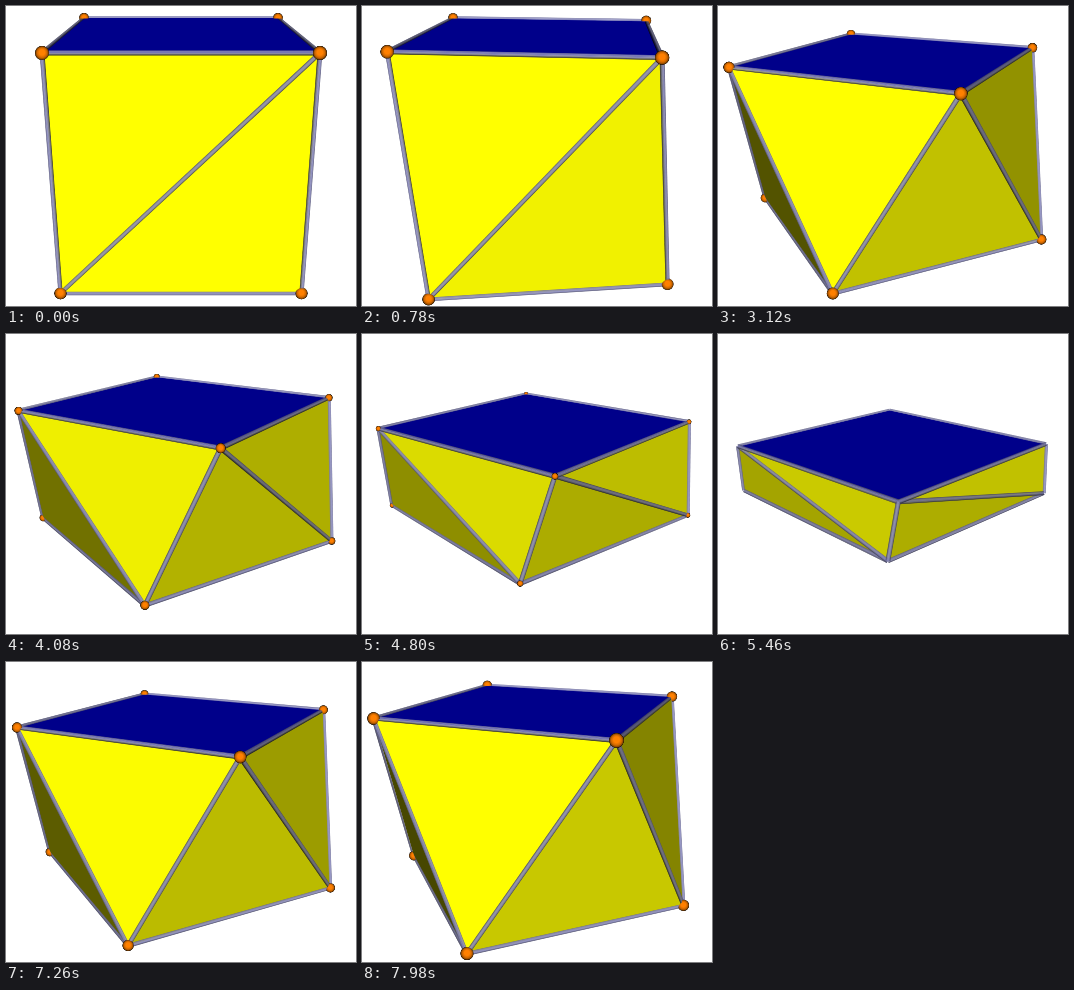
Animation of 350x300 px, one loop 8 s. Source, as an HTML page with a canvas:

```html
<!DOCTYPE html>
<html>
<head>
<meta charset="utf-8">
<title>Twisting prism</title>
<style>
  html, body { margin: 0; width: 100%; height: 100%; overflow: hidden; background: #fff; }
  canvas { display: block; }
</style>
</head>
<body>
<canvas id="stage" width="350" height="300"></canvas>
<script>
const ctx = document.getElementById('stage').getContext('2d');
const STEP = 60, LOOP = 8000, TURN = 89;
const SIN = 1 / 3, COS = Math.sqrt(1 - SIN * SIN);
const DISTANCE = 5.63, FOCAL = 605, LIFT = 0.095;
const CENTER = [175, 144.9];
const CAMERA = [0, DISTANCE * SIN - LIFT * COS, DISTANCE * COS + LIFT * SIN];
const LIGHT = [0, 0.5, 0.965], AMBIENT = 0.04;
const TUBE = 0.017, BALL = 0.05, STRIPS = 8;
const YELLOW = [255, 255, 0], BLUE = [0, 0, 255], STEEL = [136, 136, 187], ORANGE = [255, 128, 0];

const add = (a, b, k = 1) => a.map((v, i) => v + b[i] * k);
const sub = (a, b) => add(a, b, -1);
const dot = (a, b) => a[0] * b[0] + a[1] * b[1] + a[2] * b[2];
const unit = a => a.map(v => v / Math.hypot(...a));
const cross = (a, b) => [
  a[1] * b[2] - a[2] * b[1],
  a[2] * b[0] - a[0] * b[2],
  a[0] * b[1] - a[1] * b[0]
];
const brightness = normal => AMBIENT + Math.max(0, dot(normal, LIGHT));
const tint = (color, level) => `rgb(${color.map(c => Math.round(c * Math.min(1, level)))})`;

// Vertices 0-3 are the upper square, 4-7 the lower one.
const faces = [{ ids: [3, 2, 1, 0], color: BLUE }, { ids: [4, 5, 6, 7], color: BLUE }];
const edges = [];
for (let i = 0; i < 4; i++) {
  const prev = (i + 3) % 4;
  faces.push(
    { ids: [prev, i, prev + 4], color: YELLOW },
    { ids: [i + 4, prev + 4, i], color: YELLOW }
  );
  edges.push([prev, i], [prev + 4, i + 4], [i, i + 4], [i, prev + 4]);
}

function project(p) {
  const depth = DISTANCE - p[1] * SIN - p[2] * COS;
  const scale = FOCAL / depth;
  return {
    scale, depth,
    x: CENTER[0] + p[0] * scale,
    y: CENTER[1] - (p[1] * COS - p[2] * SIN + LIFT) * scale
  };
}

function polygon(points, color) {
  ctx.beginPath();
  points.map(project).forEach(({ x, y }) => ctx.lineTo(x, y));
  ctx.closePath();
  ctx.fillStyle = color;
  ctx.fill();
}

// Lengthwise strips, each lit by its own normal and left out where it lies inside the solid.
function tube(a, b, normals) {
  const axis = unit(sub(b, a));
  const side = unit(cross(axis, sub(CAMERA, add(a, sub(b, a), 0.5))));
  const front = cross(side, axis);
  for (let i = 0; i < STRIPS; i++) {
    const from = 2 * i / STRIPS - 1, to = from + 2 / STRIPS, mid = (from + to) / 2;
    const normal = add(side.map(v => v * mid), front, Math.sqrt(1 - mid * mid));
    if (!normals.some(n => dot(n, normal) > 0)) continue;
    const u = from * TUBE, w = Math.min(1, to + 0.1) * TUBE;
    polygon([add(a, side, u), add(b, side, u), add(b, side, w), add(a, side, w)],
      tint(STEEL, brightness(normal)));
  }
}

function ballShade({ x, y }, r) {
  const shade = ctx.createRadialGradient(x, y - r * 0.15, 0, x, y, r);
  for (const t of [0, 0.4, 0.7, 0.9, 1]) {
    shade.addColorStop(t, tint(ORANGE, 0.1 + Math.sqrt(1 - t * t)));
  }
  return shade;
}

function ball(p, radius) {
  const spot = project(p), r = spot.scale * radius;
  ctx.fillStyle = ballShade(spot, r);
  ctx.beginPath();
  ctx.arc(spot.x, spot.y, r, 0, 2 * Math.PI);
  ctx.fill();
}

// The part of a ball that stands out from one face: half a disc and half an ellipse.
function ballAbove(p, radius, { normal }) {
  const spot = project(p), r = spot.scale * radius;
  const angle = Math.atan2(-(normal[1] * COS - normal[2] * SIN), normal[0]);
  const facing = dot(normal, unit(sub(CAMERA, p)));
  const quarter = Math.PI / 2;
  ctx.fillStyle = ballShade(spot, r);
  ctx.beginPath();
  ctx.arc(spot.x, spot.y, r, angle - quarter, angle + quarter);
  ctx.ellipse(spot.x, spot.y, r * facing, r, angle, quarter, 3 * quarter);
  ctx.fill();
}

function draw(time) {
  const step = Math.floor(time % LOOP / STEP);
  const twist = (TURN - Math.abs(TURN - step)) * Math.PI / 360;
  // The upright edges keep their length, so twisting lowers the solid.
  const height = Math.sqrt(Math.cos(2 * twist));
  const diagonal = 2 * Math.sqrt(height * height + 1 - Math.sin(2 * twist));
  const radius = BALL * Math.min(2, diagonal) / 2;

  const vertices = Array.from({ length: 8 }, (_, i) => {
    const level = i < 4 ? 1 : -1;
    const angle = Math.PI / 4 + i % 4 * Math.PI / 2 - level * twist;
    return [Math.SQRT2 * Math.sin(angle), level * height, Math.SQRT2 * Math.cos(angle)];
  });

  const solid = faces.map(({ ids, color }) => {
    const corners = ids.map(i => vertices[i]);
    const [a, b, c] = corners;
    const normal = unit(cross(sub(c, a), sub(b, a)));
    return { ids, color, corners, normal, visible: dot(normal, sub(CAMERA, a)) > 0 };
  });
  const around = (...ids) => solid.filter(f => ids.every(i => f.ids.includes(i)));

  ctx.fillStyle = '#fff';
  ctx.fillRect(0, 0, 350, 300);

  const showBalls = radius > TUBE;
  if (showBalls) vertices.forEach(p => ball(p, radius));

  solid.filter(f => f.visible)
    .forEach(f => polygon(f.corners, tint(f.color, brightness(f.normal))));

  edges.map(([i, j]) => ({ a: vertices[i], b: vertices[j], sides: around(i, j) }))
    .filter(e => e.sides.some(f => f.visible))
    .sort((e, g) => project(add(g.a, g.b)).depth - project(add(e.a, e.b)).depth)
    .forEach(e => tube(e.a, e.b, e.sides.map(f => f.normal)));

  if (showBalls) vertices.forEach((p, i) =>
    around(i).filter(f => f.visible).forEach(f => ballAbove(p, radius, f)));
}

function tick() {
  draw(performance.now());
  requestAnimationFrame(tick);
}
tick();
</script>
</body>
</html>
```
